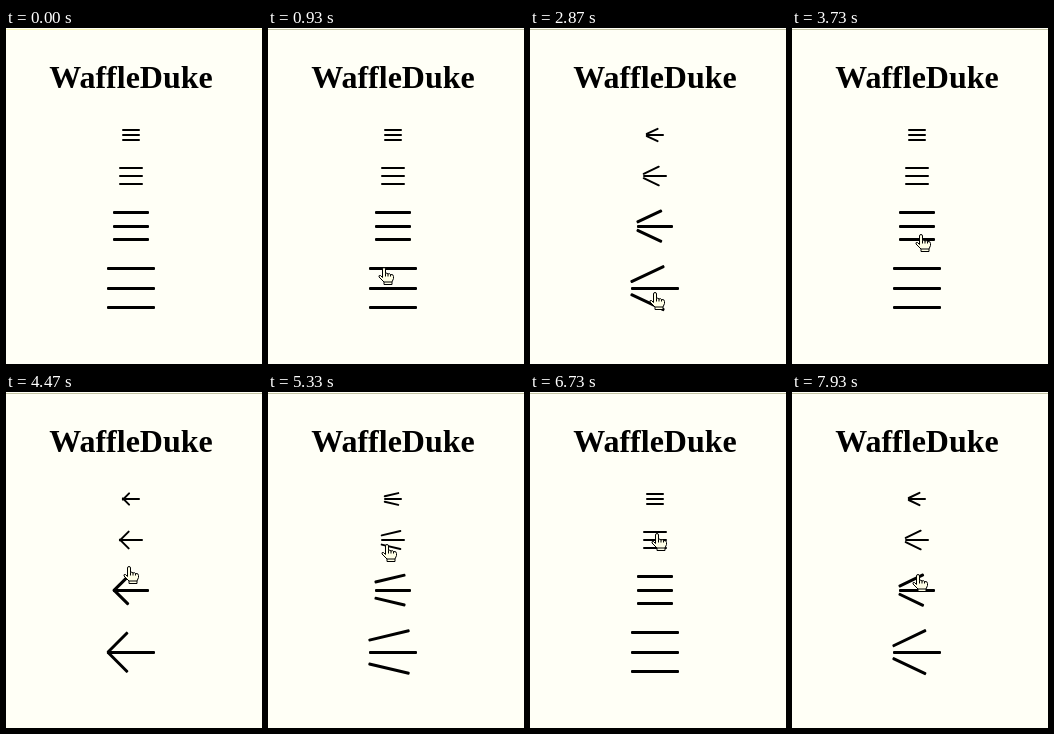
An HTML page that plays this animation: 256 by 336 pixels, repeating every 8 s.

```html
<!DOCTYPE html>
<html lang="en">
<head>
<meta charset="utf-8">
<title>Menu icons</title>
<style>
  html, body { margin: 0; width: 100%; height: 100%; overflow: hidden; background: #fffff6; }
  svg { display: block; width: 256px; height: 336px; }
  text { font: bold 32px "Liberation Serif", serif; text-anchor: middle; }
</style>
</head>
<body>
<svg viewBox="0 0 256 336">
  <rect width="256" height="336" fill="#fffff6"/>
  <rect id="edge" y="1" width="256" height="1"/>
  <text x="125" y="60">WaffleDuke</text>
  <g id="icons"></g>
  <g id="hand" stroke="#000" stroke-linejoin="round">
    <path fill="#ffffe6" d="M4.5 10.5V2Q4.5.5 6 .5T7.5 2V6.5Q9 5.5 10 7Q11.5 6 12.5 7.5Q15.5 7 15.5 9.5V11.5L14 15V17.5H6V15L1 10Q.5 8 2.5 8.5Z"/>
    <path fill="none" d="M7.5 6.5V9.5M10 7V9.5M12.5 7.5V9.5M6 15H14"/>
  </g>
</svg>
<script>
const LOOP = 8000, MORPH = 250, CX = 125;
const byId = id => document.getElementById(id);
const edge = byId('edge'), icons = byId('icons'), hand = byId('hand');

// width, top, middle and bottom bar centres, bar thickness
const sizes = [
  [18, 102, 107, 112, 2],
  [24, 140, 148, 156, 2],
  [36, 184.5, 198.5, 211.5, 3],
  [48, 240.5, 260.5, 279.5, 3]
];

// clicks alternate between opening into an arrow and closing to bars
const clicks = [1812, 2290, 2830, 3230, 3895, 4890, 5316, 5630, 5950, 6360, 6895, 7190, 7896];

// time, x, y of the pointer
const path = [
  [400, 102, 214], [530, 102, 218], [640, 102, 218], [1270, 119, 264],
  [3400, 119, 264], [3730, 123, 206], [4130, 123, 206], [4730, 113, 152],
  [6420, 113, 152], [6730, 121, 141], [7200, 121, 141], [7730, 120, 182]
];

function addBar(h) {
  const bar = document.createElementNS('http://www.w3.org/2000/svg', 'rect');
  bar.setAttribute('height', h);
  bar.setAttribute('rx', 1);
  icons.append(bar);
  return bar;
}

const bars = sizes.map(s => [0, 1, 2].map(() => addBar(s[4])));

function place(bar, cx, cy, w, h, angle) {
  bar.setAttribute('x', cx - w / 2);
  bar.setAttribute('y', cy - h / 2);
  bar.setAttribute('width', w);
  bar.setAttribute('transform', `rotate(${angle} ${cx} ${cy})`);
}

function backOut(u) {
  const k = 1.70158, v = u - 1;
  return 1 + (k + 1) * v ** 3 + k * v * v;
}

function arrowAmount(t) {
  const n = clicks.filter(c => c <= t).length;
  if (!n) return 0;
  const e = backOut(Math.min(1, (t - clicks[n - 1]) / MORPH));
  return n % 2 ? e : 1 - e;
}

function pointer(t) {
  const i = path.findIndex(p => p[0] > t);
  if (i < 0) return path[path.length - 1].slice(1);
  const a = path[i - 1], b = path[i];
  const u = (t - a[0]) / (b[0] - a[0]), e = u * u * (3 - 2 * u);
  return [1, 2].map(k => Math.round(a[k] + (b[k] - a[k]) * e));
}

function draw(ms) {
  // 15 steps per second
  const t = Math.floor((ms % LOOP + 4) * 0.015) / 0.015 % LOOP;
  const p = arrowAmount(t);

  edge.setAttribute('fill', t < 130 ? '#f8f6b8' : '#c4c4a4');

  sizes.forEach(([w, top, mid, bottom, h], i) => {
    const len = w * (1 - 0.4 * p), cx = CX - 0.28 * w * p;
    place(bars[i][0], cx, top + (mid - top) / 2 * p, len, h, -45 * p);
    place(bars[i][1], CX, mid, w, h, 0);
    place(bars[i][2], cx, bottom - (bottom - mid) / 2 * p, len, h, 45 * p);
  });

  const shown = t >= path[0][0];
  hand.setAttribute('visibility', shown ? 'visible' : 'hidden');
  if (shown) hand.setAttribute('transform', `translate(${pointer(t)})`);
}

const start = performance.now();
function tick() {
  draw(performance.now() - start);
  requestAnimationFrame(tick);
}
tick();
</script>
</body>
</html>
```
